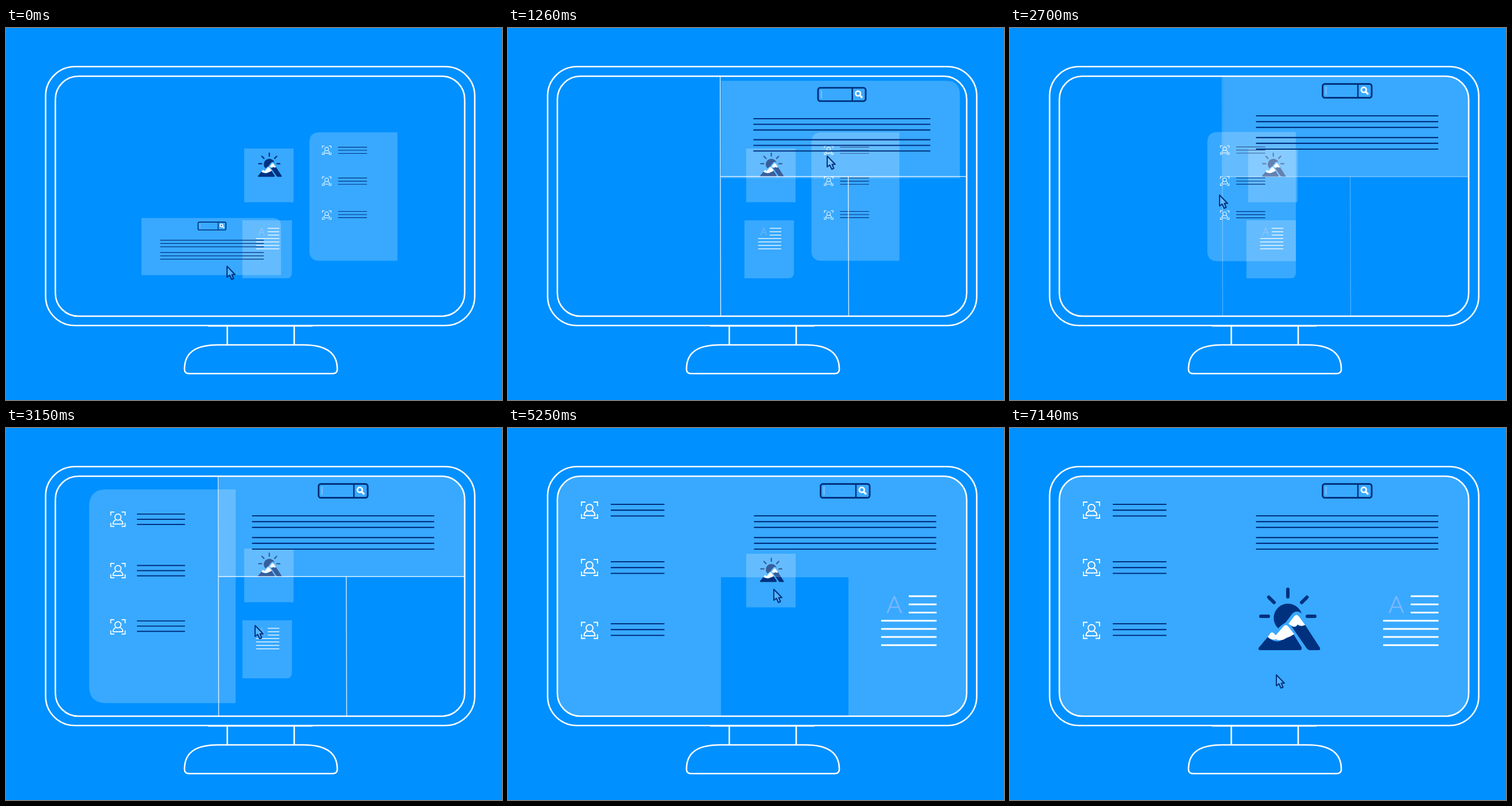
Write an HTML page that moves like this. It is 864 by 648 pixels and loops after 7.17 s.

```html
<!DOCTYPE html>
<html lang="en">
<head>
<meta charset="utf-8">
<title>Screen layout</title>
<style>
html, body { margin: 0; width: 100%; height: 100%; overflow: hidden; background: #0090ff; }
svg { display: block; width: 864px; height: 648px; fill: none; }
.panel { fill: #fff; fill-opacity: .22; }
.navy { stroke: #00317f; }
.white { stroke: #fff; }
text { font: 300 41px Lato, sans-serif; fill: #7fb8ff; stroke: #7fb8ff; stroke-width: .7; text-anchor: middle; }
</style>
</head>
<body>
<svg viewBox="0 0 864 648">
  <defs>
    <clipPath id="screen"><rect x="86" y="84" width="713" height="418" rx="40"/></clipPath>
    <g id="person" class="white" stroke-width="1.9">
      <path d="M-14-7V-14H-7M7-14H14V-7M14 7V14H7M-7 14H-14V7"/>
      <circle cy="-4" r="6"/>
      <path d="M-4 1.5Q-9.5 3-9.5 9.5H9.5Q9.5 3 4 1.5"/>
    </g>
  </defs>

  <g clip-path="url(#screen)">
    <!-- Panel contents use the coordinates of the finished layout. -->
    <g id="picture">
      <path class="panel" d="M371 260H593V501H371Z"/>
      <path id="rays" class="navy" stroke-width="6" stroke-linecap="round"/>
      <g fill="#00317f">
        <path d="M467 349A25 25 0 1 1 508 323Q500 316 492 323L480 339Q474 342 467 349Z"/>
        <path d="M433 383L449 364Q460 374 470 371Q482 366 493 358L508 382Q509 387 505 387H436Q432 387 433 383Z"/>
        <path d="M490 345Q497 349 501 343Q507 346 514 343L540 383Q541 387 537 387H522Q519 387 517 384Z"/>
      </g>
      <g fill="#fff">
        <path d="M449 364L454 357Q456 355 459 357L463 361L477 345Q481 341 485 346L495 359Q488 364 481 366Q473 372 463 368Q455 370 449 364Z"/>
        <path d="M485 341L495 328Q499 323 503 328L514 343Q506 347 501 342Q497 349 490 344Z"/>
      </g>
    </g>
    <g id="article">
      <path class="panel" d="M593 260H799V477Q799 501 775 501H593Z"/>
      <text x="673" y="322">A</text>
      <path id="articleLines" class="white" stroke-width="3"/>
    </g>
    <g id="sidebar">
      <path class="panel" d="M371 85V501H119Q86 501 86 468V118Q86 85 119 85Z"/>
      <path id="sidebarLines" class="navy" stroke-width="2.1"/>
      <use href="#person" x="142" y="143"/>
      <use href="#person" x="142" y="243"/>
      <use href="#person" x="142" y="352.5"/>
    </g>
    <g id="header">
      <path class="panel" d="M371 85H774Q799 85 799 110V260H371Z"/>
      <rect class="navy" x="544.5" y="97.5" width="85.5" height="24" rx="4" stroke-width="3"/>
      <path class="navy" stroke-width="2.5" d="M606 98V121"/>
      <path stroke="#7fb8ff" stroke-width="2.5" d="M550.5 102V116.5"/>
      <circle class="white" cx="616.3" cy="107.7" r="4.3" stroke-width="2.8"/>
      <path class="white" stroke-width="3.2" d="M619 110.5L624 115.5"/>
      <path id="headerLines" class="navy" stroke-width="2.2"/>
    </g>
    <path id="guides" class="white" stroke-width="1.3" d="M369.6 85L370.5 501M370 258.7H799M592.7 259L593.5 501"/>
  </g>

  <g class="white" stroke-width="2.6">
    <rect x="86" y="84" width="713" height="418" rx="40"/>
    <rect x="69" y="67.3" width="747.5" height="451" rx="51"/>
    <path d="M352 519H534M385.5 519V551.5M502 519V551.5"/>
    <path d="M311 592C312 562 335 552 370 552H518C553 552 576 563 577 592Q578 602 569 602H319Q310 602 311 592Z"/>
  </g>
  <path id="cursor" class="navy" stroke-width="2" stroke-linejoin="round" fill="#fff" fill-opacity=".15"
    d="M0 0V19L4.5 15.5L8 23L11.5 21.5L8.5 14.5H14Z"/>
</svg>
<script>
const LOOP = 7170, TRAVEL = 250, SETTLE = 700, FADE = 100;
const IDLE = [385, 415];
const $ = id => document.getElementById(id);

// Each panel is grabbed, dragged, dropped, and then grows into its home.
const steps = [
  { id: "header", grabAt: 250, dropAt: 672, grab: [412, 366], drag: [144, -143],
    from: [236, 331], home: [371, 85], size: .568 },
  { id: "sidebar", grabAt: 1653, dropAt: 2667, grab: [548, 291], drag: [-183, 0],
    from: [528.5, 181.8], home: [86, 85], size: .538 },
  { id: "article", grabAt: 3228, dropAt: 4270, grab: [454, 359.5], drag: [115, -3],
    from: [411.8, 335], home: [593, 260], size: .419 },
  { id: "picture", grabAt: 5106, dropAt: 6106, grab: [463, 272], drag: [1, 158],
    from: [414.8, 210], home: [371, 260], size: .388 }
];

const clamp = v => Math.max(0, Math.min(1, v));
const ease = v => { const u = clamp(v); return u * u * (3 - 2 * u); };
const mix = (a, b, p) => a + (b - a) * p;
const mixPoint = (a, b, p) => a.map((v, i) => mix(v, b[i], p));
const shift = (a, b, p) => a.map((v, i) => v + b[i] * p);

// A block of evenly spaced text lines, as path data.
const lines = (left, right, top, count, gap) =>
  Array.from({ length: count }, (_, i) => `M${left} ${top + i * gap}H${right}`).join("");

$("headerLines").setAttribute("d", lines(428.5, 746, 153, 3, 10.1) + lines(428.5, 746, 190.8, 3, 10.1));
$("articleLines").setAttribute("d", lines(698, 746.5, 293, 3, 14.2) + lines(650, 746.5, 335.7, 4, 14.2));
$("sidebarLines").setAttribute("d", [133, 233, 341].map(y => lines(179, 272.5, y, 3, 10.1)).join(""));
$("rays").setAttribute("d", [0, 1, 2, 3, 4].map(i => {
  const a = i * Math.PI / 4;
  const at = r => `${484 - r * Math.cos(a)} ${328 - r * Math.sin(a)}`;
  return `M${at(34)}L${at(47)}`;
}).join(""));

function draw(t) {
  let cursor = IDLE, guides = 0;
  for (const { id, grabAt, dropAt, grab, drag, from, home, size } of steps) {
    const moved = ease((t - grabAt) / (dropAt - grabAt));
    const settled = ease((t - dropAt) / SETTLE);
    const [x, y] = mixPoint(shift(from, drag, moved), home, settled);
    $(id).setAttribute("transform",
      `translate(${x} ${y}) scale(${mix(size, 1, settled)}) translate(${-home[0]} ${-home[1]})`);

    cursor = mixPoint(cursor, grab, ease((t - grabAt + TRAVEL) / TRAVEL));
    cursor = shift(cursor, drag, moved);
    guides = Math.max(guides, clamp(Math.min(t - dropAt, dropAt + SETTLE - t) / FADE));
  }
  $("cursor").setAttribute("transform", `translate(${cursor})`);
  $("guides").setAttribute("opacity", guides * .9);
}

const start = performance.now();
function tick() {
  draw((performance.now() - start) % LOOP);
  requestAnimationFrame(tick);
}
tick();
</script>
</body>
</html>
```
